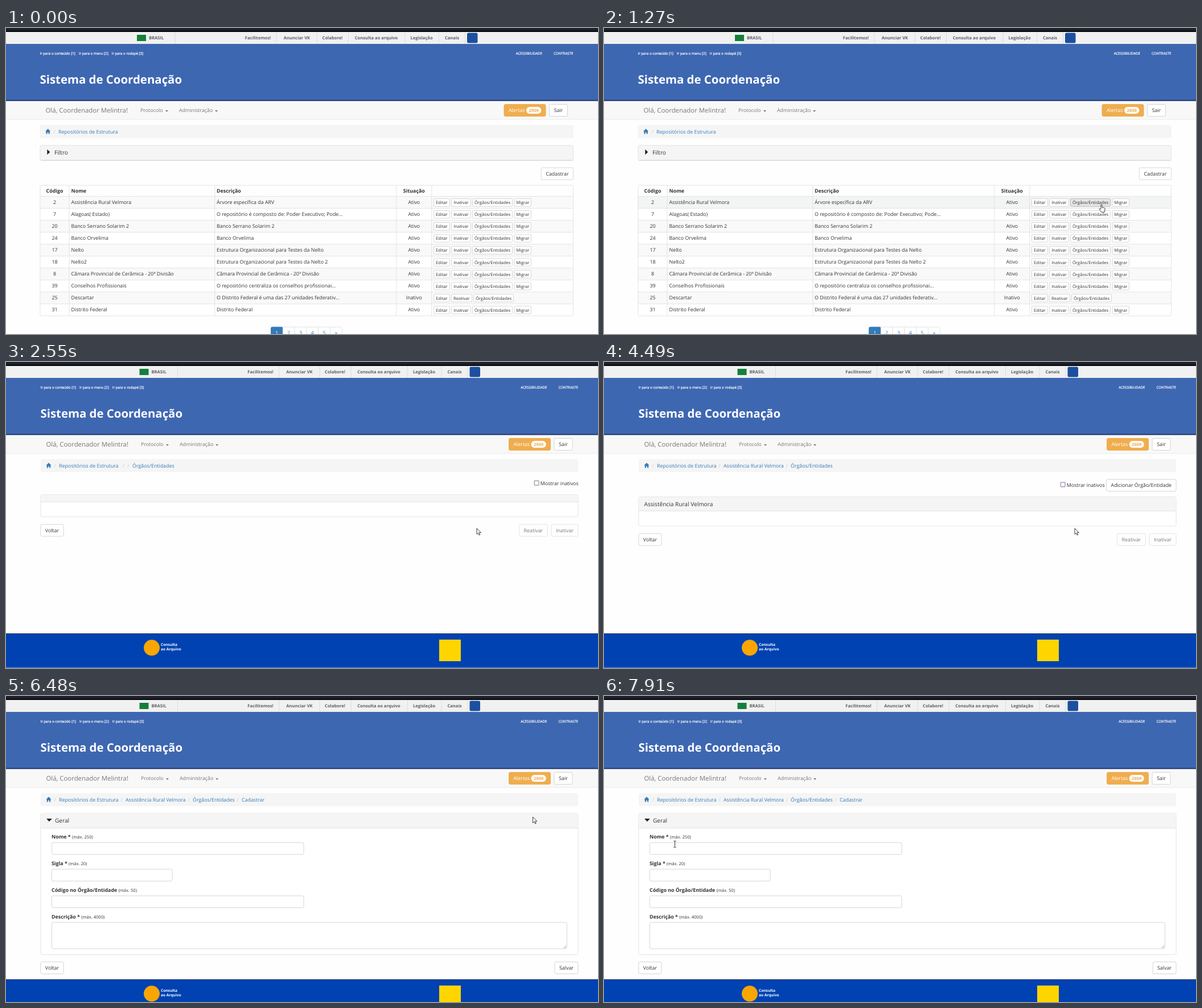
Animation, 1040 px wide and 539 px high, one loop 8000 ms. Source, as an HTML page:

```html
<!DOCTYPE html>
<html lang="pt-BR">
<head>
<meta charset="utf-8">
<title>Repositórios de Estrutura</title>
<style>
html, body { margin: 0; width: 100%; height: 100%; overflow: hidden; background: #fefefe; }
svg { display: block; width: 1040px; height: 539px; }
text { font-family: "Open Sans", "Noto Sans", sans-serif; text-rendering: geometricPrecision; white-space: pre; }
</style>
</head>
<body>
<svg id="stage" viewBox="0 0 1040 539" xmlns="http://www.w3.org/2000/svg"></svg>
<script>
const LOOP = 8000;
const MD = 8.855, SM = 7.59, LG = 10.12;
const LINK = '#337ab7', INK = '#333', GRAY = '#777';
const ORG = 'Assistência Rural Velmora';

const rect = (x, y, w, h, fill, extra = '') =>
  `<rect x="${x}" y="${y}" width="${w}" height="${h}" fill="${fill}" ${extra}/>`;
const box = (x, y, w, h, fill = '#fff', line = '#ccc', r = 2.5, extra = '') =>
  rect(x, y, w, h, fill, `stroke="${line}" stroke-width=".8" rx="${r}" ${extra}`);
const text = (x, y, s, { size = MD, fill = INK, bold = false, mid = false } = {}) =>
  `<text x="${x}" y="${y}" font-size="${size}" fill="${fill}"${bold ? ' font-weight="700"' : ''}` +
  `${mid ? ' text-anchor="middle"' : ''}>${s}</text>`;
const path = (d, fill, extra = '') => `<path d="${d}" fill="${fill}" ${extra}/>`;
const group = (id, body) => `<g id="${id}">${body}</g>`;
const vline = (x, y1, y2, c = '#ddd') => path(`M${x} ${y1}V${y2}`, 'none', `stroke="${c}" stroke-width=".8"`);
const hline = (x1, x2, y, c = '#ddd') => path(`M${x1} ${y}H${x2}`, 'none', `stroke="${c}" stroke-width=".8"`);
const button = (x, y, w, s, extra = '') =>
  `<g ${extra}>${box(x, y, w, 21, '#fff')}${text(x + w / 2, y + 13.6, s, { mid: true })}</g>`;
const faded = 'opacity=".65"';

// Page header; the three shifts follow the width of the scroll bar.
function header(left, mid, right) {
  const menu = [['Facilitemos!', 442.5], ['Anunciar VK', 511], ['Colabore!', 573.5],
    ['Consulta ao arquivo', 650.5], ['Legislação', 730], ['Canais', 783.5]];
  const tab = { size: SM, fill: '#606060', bold: true };
  const tiny = (x, s) => `<g stroke="#fff" stroke-width=".2">${text(x, 46.8, s, { size: 6.17, fill: '#fff' })}</g>`;
  const caret = x => path(`M${x} 145h5.2l-2.6 2.7z`, GRAY);
  return rect(0, 0, 1040, 5, '#1c202b') + rect(0, 5, 1040, 2, '#05060a') +
    rect(0, 7, 1040, 21, '#f1f1f1') +
    `<g transform="translate(${mid} 0)">` +
      rect(230, 12, 16, 11, '#14803a') + text(251, 19.8, 'BRASIL', tab) +
      [297, 475, 546.5, 601.5, 701, 760.5, 806.5].map(x => vline(x, 7, 27.5, '#d8d8d8')).join('') +
      menu.map(([s, x]) => text(x, 19.6, s, { ...tab, mid: true })).join('') +
      rect(810, 8.5, 18.5, 18, '#1b4f9f', 'rx="2.5"') +
    '</g>' +
    rect(0, 28, 1040, 99, '#3e67b1') + rect(0, 126.7, 1040, 2.1, '#21346a') +
    rect(0, 128.8, 1040, 32.4, '#f8f8f8') + hline(0, 1040, 161.2, '#e7e7e7') +
    `<g transform="translate(${left} 0)">` +
      tiny(59.5, 'Ir para o conteúdo [1]') + tiny(128, 'Ir para o menu [2]') + tiny(185.7, 'Ir para o rodapé [3]') +
      text(59.5, 98, 'Sistema de Coordenação', { size: 20.4, fill: '#fff', bold: true }) +
      text(69.5, 149.4, 'Olá, Coordenador Melintra!', { size: 11.385, fill: GRAY }) +
      text(236, 148.2, 'Protocolo', { fill: GRAY }) + caret(279.8) +
      text(304, 148.2, 'Administração', { fill: GRAY }) + caret(367) +
    '</g>' +
    `<g transform="translate(${right} 0)">` +
      tiny(895.7, 'ACESSIBILIDADE') + tiny(962, 'CONTRASTE') +
      box(875, 134.5, 73, 21, '#f0ad4e', '#eea236') + text(883, 148.2, 'Alertas', { fill: '#fff' }) +
      rect(914, 139, 26.3, 12, '#fff', 'rx="6"') +
      text(927.2, 147.8, '2909', { size: SM, fill: '#f0ad4e', bold: true, mid: true }) +
      button(954.5, 134.5, 32, 'Sair') +
    '</g>';
}

function crumbs(x, right, items) {
  const h = x + 9.5;
  return rect(x, 171, right - x, 23, '#f5f5f5', 'rx="2.5"') +
    path(`M${h} 182.3l4.6-4.7 4.6 4.7h-1.4v4.3h-2.2v-2.8h-2v2.8h-2.2v-4.3z`, LINK) +
    items.map(([s, at]) => text(at - 8.5, 185.5, '/', { fill: '#ccc' }) + text(at, 185.5, s, { fill: LINK })).join('');
}

// List page
const rows = [
  [2, ORG, 'Árvore específica da ARV'],
  [7, 'Alagoas( Estado)', 'O repositório é composto de: Poder Executivo; Pode...'],
  [20, 'Banco Serrano Solarim 2', 'Banco Serrano Solarim 2'],
  [24, 'Banco Orvelima', 'Banco Orvelima'],
  [17, 'Nelto', 'Estrutura Organizacional para Testes da Nelto'],
  [18, 'Nelto2', 'Estrutura Organizacional para Testes da Nelto 2'],
  [8, 'Câmara Provincial de Cerâmica - 20ª Divisão', 'Câmara Provincial de Cerâmica - 20ª Divisão'],
  [39, 'Conselhos Profissionais', 'O repositório centraliza os conselhos profissionai...'],
  [25, 'Descartar', 'O Distrito Federal é uma das 27 unidades federativ...'],
  [31, 'Distrito Federal', 'Distrito Federal']
];
const TOP = 296.6, STEP = 21.04;
const actions = off => off
  ? [['Editar', 751.5, 28], ['Reativar', 782.5, 36], ['Órgãos/Entidades', 821.5, 70]]
  : [['Editar', 751.5, 28], ['Inativar', 782.5, 34], ['Órgãos/Entidades', 819.5, 70], ['Migrar', 893, 29.5]];

function tableRow([code, name, about], i) {
  const y = TOP + i * STEP, base = y + 13.2, off = name === 'Descartar';
  return rect(59.5, y, 937, STEP, i % 2 ? '#fff' : '#f9f9f9', 'class="row"') + hline(59.5, 996.5, y) +
    text(85.5, base, code, { mid: true }) + text(114.5, base, name) + text(370, base, about) +
    text(716.8, base, off ? 'Inativo' : 'Ativo', { mid: true }) +
    actions(off).map(([s, x, w]) =>
      box(x, y + 4, w, 13.6, '#fff', '#ccc', 1.8, 'class="act"') +
      text(x + w / 2, y + 13.7, s, { size: SM, mid: true })).join('');
}

function listPage() {
  const end = TOP + 10 * STEP;
  const th = { bold: true };
  const pages = ['1', '2', '3', '4', '5', '»'];
  return header(0, 0, 0) + crumbs(59.5, 997, [['Repositórios de Estrutura', 92]]) +
    box(59.9, 206.8, 936.7, 26.2, '#f5f5f5', '#ddd') + hline(61, 996, 233.2, '#ccc') +
    path('M72.3 213.8v9.4l5-4.7z', '#222') + text(85, 223, 'Filtro', { size: LG }) +
    button(940.2, 246.2, 56.5, 'Cadastrar') +
    text(85.5, 290, 'Código', { ...th, mid: true }) + text(114.5, 290, 'Nome', th) +
    text(370, 290, 'Descrição', th) + text(716.8, 290, 'Situação', { ...th, mid: true }) +
    rows.map(tableRow).join('') +
    [111, 366.8, 685.7, 747.8].map(x => vline(x, 277.2, end)).join('') +
    box(59.9, 277.2, 936.7, end - 277.2, 'none', '#ddd', 2) +
    pages.map((s, i) => box(465.5 + i * 20.8, 526.8, 20.8, 21, i ? '#fff' : LINK, i ? '#ddd' : LINK, i % 5 ? 0 : 2) +
      text(475.9 + i * 20.8, 540.2, s, { fill: i ? LINK : '#fff', mid: true })).join('');
}

// Tree and form pages
const L = 60.9, R = 1005;
const footer = y => {
  const word = { size: 6.6, fill: '#fff', bold: true };
  return rect(0, y, 1040, 61, '#0042b1') + rect(0, y, 1040, 1, '#1d3158') + rect(0, y + 59, 1040, 2, '#3a68b8') +
    `<circle cx="256" cy="${y + 25.3}" r="14" fill="#f9a602"/>` +
    text(272, y + 22, 'Consulta', word) + text(272, y + 30.4, 'ao Arquivo', word) +
    rect(761, y + 11, 38, 38, '#ffd500');
};
const panel = (y, head, bottom) => box(L, y, R - L, bottom - y, '#fff', '#ddd') +
  rect(L + .4, y + .4, R - L - .8, head - y, '#f5f5f5', 'rx="2"') + hline(L, R, head);
const footButtons = y => button(L, y, 40.2, 'Voltar') +
  button(901.4, y, 50, 'Reativar', faded) + button(958, y, 47, 'Inativar', faded);
const check = (x, y, line) => box(x, y, 7.8, 7.8, '#fff', line, .5) + text(x + 10.6, y + 7.8, 'Mostrar inativos');

const crumb1 = ['Repositórios de Estrutura', 93], crumb2 = [ORG, 210], crumb3 = ['Órgãos/Entidades', 328];
const emptyTree = crumbs(L, R, [crumb1, ['', 213], ['Órgãos/Entidades', 222]]) +
  check(928.2, 209.2, '#555') + panel(233.8, 246.5, 272.8) + footButtons(286);
const tree = (bottom, item) => crumbs(L, R, [crumb1, crumb2, crumb3]) +
  check(802.2, 212, '#6b3a78') +
  box(882.6, 206.6, 122.4, 21, '#fff', '#ccc', 2.5, 'class="act"') +
  text(943.8, 220.3, 'Adicionar Órgão/Entidade', { mid: true }) +
  panel(237.6, 262.4, bottom) + text(70.5, 253.6, ORG, { size: LG }) + item + footButtons(bottom + 13.2);
const treeItem = path('M82.4 275v9l5-4.5z', LINK) +
  '<circle cx="95.2" cy="279.3" r="3.9" fill="#fff" stroke="#666" stroke-width=".8"/>' +
  text(102, 283, ORG + ' - ARV (81778)');

const field = (y, label, max, w, h = 21) =>
  text(80, y, `${label} <tspan font-size="${SM}" font-weight="400">(máx. ${max})</tspan>`, { bold: true }) +
  box(80.4, y + 6.8, w, h, '#fff', '#ccc', 2.5, 'class="field"');
const form = crumbs(L, R, [crumb1, crumb2, crumb3, ['Cadastrar', 414]]) +
  panel(206.8, 232.6, 455.4) + path('M71 216h9.8l-4.9 5.3z', '#222') + text(86, 223, 'Geral', { size: LG }) +
  field(251.3, 'Nome *', 250, 442.6) + field(298.2, 'Sigla *', 20, 211.6) +
  field(345.1, 'Código no Órgão/Entidade', 50, 442.6) + field(392, 'Descrição *', 4000, 905, 46.4) +
  path('M979.5 444l4.5-4.5M982 444l2-2', 'none', 'stroke="#777" stroke-width=".7"') +
  button(L, 468.4, 40.2, 'Voltar') + button(964, 468.4, 41, 'Salvar');

const edge = 'stroke="#111" stroke-width=".8" stroke-linejoin="round"';
const stage = document.getElementById('stage');
stage.innerHTML = rect(0, 0, 1040, 539, '#fefefe') +
  group('list', listPage()) +
  group('frame', header(1, 4.5, 8.5)) +
  group('empty', emptyTree + footer(478)) +
  group('titled', tree(289, '') + footer(478)) +
  group('loaded', tree(302.8, treeItem) + footer(478)) +
  group('form', form + footer(499)) +
  group('arrow', path('M0 0V10.4L2.4 8.3 4.1 12 5.7 11.3 4.1 7.6H7.4z', '#fff', edge)) +
  group('hand', path('M-1 7.6V.9a1 1 0 0 1 2 0V5l3.9.9q1.4.4 1.2 2L5 13.4H-.2L-3.8 8.6q-.3-1.6 1.3-1z', '#fff', edge)) +
  group('beam', path('M-2.2-5.6h1.6l.6.6.6-.6h1.6M0-5V5M-2.2 5.6h1.6L0 5l.6.6h1.6', 'none', 'stroke="#222" stroke-width=".9"'));

const el = id => document.getElementById(id);
const rowEls = [...stage.querySelectorAll('.row')];

// Pointer track: time, x, y; rests are two equal places in a row.
const track = [
  [90, 996, 540], [650, 868, 336], [840, 866, 318], [910, 866, 318], [1050, 874, 311],
  [1630, 874, 311], [2020, 824.5, 293], [2470, 824.5, 293], [2550, 827, 293],
  [5430, 827, 293], [5770, 925.5, 213], [6790, 925.5, 213], [7090, 788, 243],
  [7220, 460, 254], [7530, 141, 237], [7600, 141, 237], [7910, 124.5, 261]
];
const slope = (i, c) => (track[i + 1][c] - track[i][c]) / (track[i + 1][0] - track[i][0]);
// Speed at a key: zero at rests and turns, otherwise between both sides.
function speed(i, c) {
  if (i === 0) return 1.5 * slope(0, c);
  if (i === track.length - 1) return 0;
  const a = slope(i - 1, c), b = slope(i, c);
  return a * b > 0 ? 2 * a * b / (a + b) : 0;
}
function pointer(t) {
  const next = track.findIndex(k => k[0] > t);
  if (next === 0) return track[0].slice(1);
  if (next < 0) return track[track.length - 1].slice(1);
  const i = next - 1, a = track[i], b = track[next];
  const span = b[0] - a[0], p = (t - a[0]) / span, q = 1 - p;
  return [1, 2].map(c =>
    a[c] * q * q * (1 + 2 * p) + b[c] * p * p * (3 - 2 * p) +
    span * p * q * (speed(i, c) * q - speed(next, c) * p));
}

const scenes = [['list', 0], ['empty', 1360], ['titled', 4490], ['loaded', 4750], ['form', 6460]];
const PRESS = 6320, LAG = 60;
const show = (id, on) => { el(id).style.display = on ? '' : 'none'; };
function over(node, [x, y]) {
  const [left, top, w, h] = ['x', 'y', 'width', 'height'].map(n => +node.getAttribute(n));
  return x >= left && x <= left + w && y >= top && y <= top + h;
}

function draw(t) {
  const scene = scenes.filter(s => s[1] <= t).pop()[0];
  scenes.forEach(([id]) => show(id, id === scene));
  show('frame', scene !== 'list');

  // The page reacts a little later than the pointer moves.
  const at = pointer(t), late = pointer(t - LAG);
  rowEls.forEach((n, i) => n.setAttribute('fill', over(n, late) ? '#f3f4f4' : i % 2 ? '#fff' : '#f9f9f9'));
  const buttons = [...el(scene).querySelectorAll('.act')];
  buttons.forEach(n => {
    const on = over(n, late);
    n.setAttribute('fill', !on ? '#fff' : t >= PRESS ? '#d4d4d4' : '#e6e6e6');
    n.setAttribute('stroke', on ? '#adadad' : '#ccc');
  });

  const fields = [...el(scene).querySelectorAll('.field')];
  const shape = fields.some(n => over(n, at)) ? 'beam' : buttons.some(n => over(n, at)) ? 'hand' : 'arrow';
  ['arrow', 'hand', 'beam'].forEach(id => {
    show(id, id === shape);
    el(id).setAttribute('transform', `translate(${at.map(v => v.toFixed(2)).join(' ')})`);
  });
}

const start = performance.now();
function tick(now) {
  draw(Math.max(0, now - start) % LOOP);
  requestAnimationFrame(tick);
}
draw(0);
requestAnimationFrame(tick);
</script>
</body>
</html>
```
